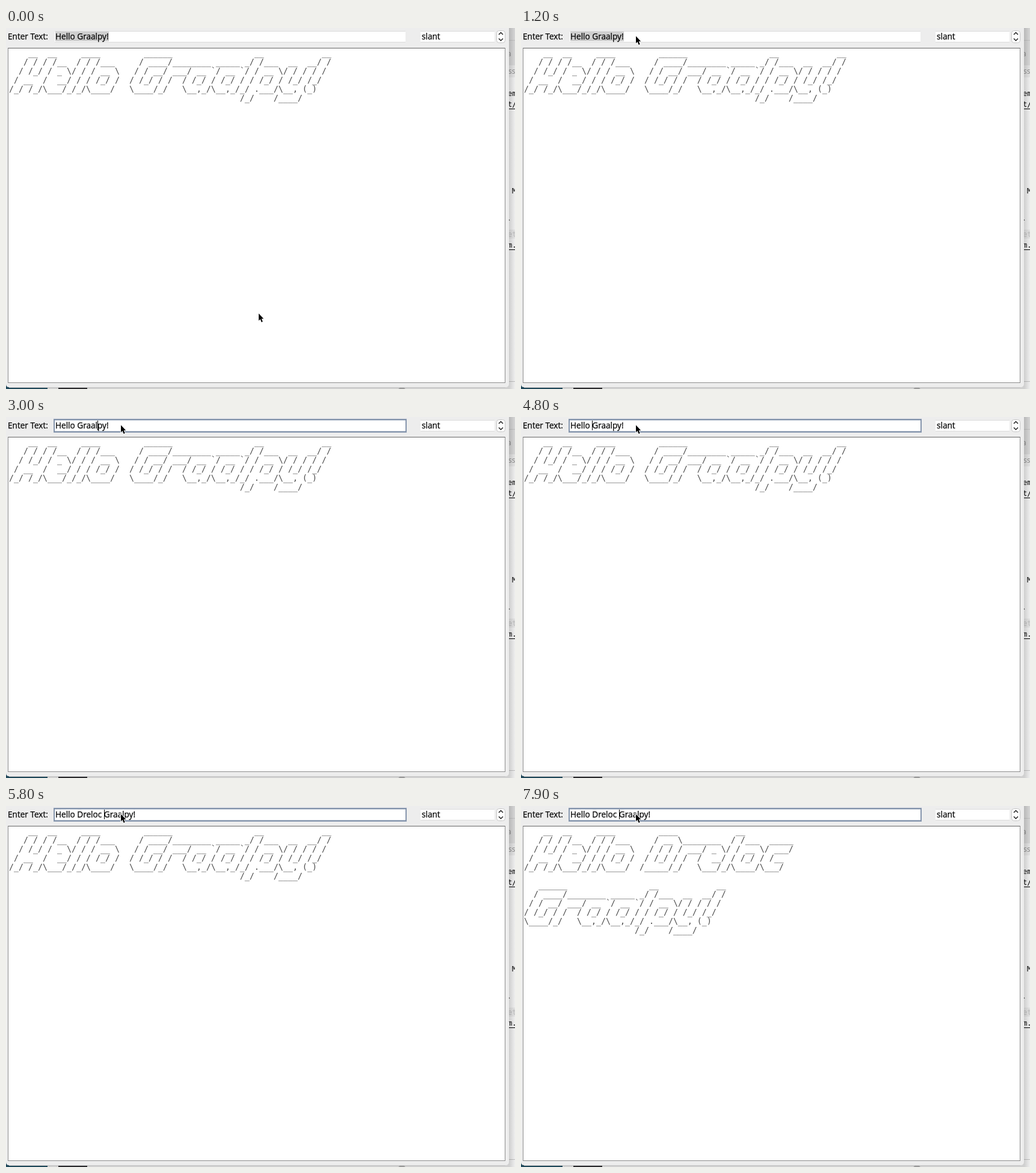
An HTML page that plays this animation: 846x600 px, repeating every 8 s.

```html
<!DOCTYPE html>
<html lang="en">
<head>
<meta charset="utf-8">
<title>Text banner</title>
<style>
  html, body { margin: 0; width: 100%; height: 100%; overflow: hidden; background: #ededed; }
  #stage { position: relative; width: 846px; height: 600px; overflow: hidden; color: #000;
    font: 13.6px/19px "Open Sans", "Noto Sans", sans-serif; white-space: pre; }
  #stage > * { position: absolute; box-sizing: border-box; }
  svg { left: 0; top: 0; }
  .field { top: 5px; height: 19px; background: #fff; border: solid #dcdcdc; border-width: 1px 0; }
  #input { left: 81px; width: 583px; }
  #input.focused { border-color: #c3ccd8; box-shadow: 0 0 0 1px #7b8ca5, 0 0 0 2px #8f9eb4; }
  #choice { left: 689px; width: 123px; }
  .label { top: 4px; -webkit-text-stroke: .25px #000; }
  #text { left: 82px; }
  #text.selected { top: 6px; height: 16px; line-height: 15px; background: #cecece; }
  #caret { display: inline-block; width: 1px; height: 16px; margin-right: -1px;
    background: #000; vertical-align: -3px; }
  #page { left: 3px; top: 33px; width: 827px; height: 557px; background: #fff;
    border: 1px solid #8c8c8c; border-top-color: #666; }
  pre { margin: 0; left: 5px; top: 34px; color: #484848;
    font: 13.29px/15px "DejaVu Sans Mono", monospace; }
  #word { left: calc(5px + 24ch); }
  #name { left: calc(5px + 25ch); }
  #name.wrapped { left: 5px; top: 124px; }
</style>
</head>
<body>
<div id="stage">
  <svg width="846" height="600">
    <defs>
      <linearGradient id="shade">
        <stop stop-opacity=".17"/><stop offset="1" stop-opacity=".04"/>
      </linearGradient>
    </defs>
    <path fill="#f8f8f8" d="M820 0h26v600h-26z"/>
    <path fill="#dedede" d="M820 0h26v62h-26z"/>
    <path fill="#ececec" d="M820 62h26v20h-26zM820 335h26v15h-26z"/>
    <path stroke="#c8c8c8" d="M836 20.5h10M836 587.5h10"/>
    <g font-family="DejaVu Sans Mono, monospace" font-size="12">
      <g fill="#8c8c8c" font-family="Open Sans, sans-serif">
        <text x="833" y="47">a</text><text x="835" y="76">ss</text>
      </g>
      <text x="834" y="113">em</text>
      <text x="834" y="131">t/</text>
      <text x="841" y="275">M</text>
      <text x="833" y="328">`</text>
      <text x="834" y="347" fill="#c4c4c4">et</text>
      <text x="834" y="365">m.</text>
      <path stroke="#000" d="M836 134.5h10M836 368.5h10"/>
    </g>
    <path fill="url(#shade)" d="M836 0h10v600h-10z"/>
    <path fill="#d0d0d0" d="M0 590h836v10H0z"/>
    <path fill="#20485a" d="M0 590h69v10H0z"/>
    <path fill="#2b2b2e" d="M87 590h48v10H87z"/>
    <circle cx="658" cy="604" r="7" fill="#999"/>
    <path fill="#ededed" d="M0 0H836V591Q836 597 830 597H5Q0 597 0 592Z"/>
    <path stroke="#c4c4c4" d="M5 597.5H830"/>
    <rect x="815.5" y="4.5" width="14" height="20" rx="4" fill="#fff" stroke="#c6c6c6"/>
    <path fill="none" stroke="#222" stroke-width="1.5" d="M819 11l3.5-3.5L826 11M819 17.5l3.5 3.5 3.5-3.5"/>
  </svg>

  <div class="label" style="left:3px">Enter Text:</div>
  <div id="input" class="field"></div>
  <div id="text" class="label"><span id="before"></span><i id="caret"></i><span id="after"></span></div>
  <div id="choice" class="field"></div>
  <div class="label" style="left:691px">slant</div>
  <div id="page"></div>

<pre>
    __  __     ____
   / / / /__  / / /___
  / /_/ / _ \/ / / __ \
 / __  /  __/ / / /_/ /
/_/ /_/\___/_/_/\____/</pre>
<pre id="word">
    ____            __
   / __ \________  / /___  _____
  / / / / ___/ _ \/ / __ \/ ___/
 / /_/ / /  /  __/ / /_/ / /__
/_____/_/   \___/_/\____/\___/</pre>
<pre id="name">
   ______                 __            __
  / ____/________ _____ _/ /___  __  __/ /
 / / __/ ___/ __ `/ __ `/ / __ \/ / / / /
/ /_/ / /  / /_/ / /_/ / / /_/ / /_/ /_/
\____/_/   \__,_/\__,_/_/ .___/\__, (_)
                       /_/    /____/</pre>

  <svg width="846" height="600">
    <circle id="click" cx="191" cy="13" r="19.7" fill="none" stroke="#000" stroke-width="2.8"/>
    <path id="pointer" d="M1 .5V12.6L3.6 10.1 5.7 14.9 7.7 14 5.7 9.3H9.2Z"
      stroke="#fff" stroke-width="1.6" paint-order="stroke"/>
  </svg>
</div>
<script>
const LOOP = 8000, FOCUS = 1500, CARET_START = 1600, REDRAW = 6800, BLINK = 500;
const greeting = "Hello Graalpy!", inserted = "Dreloc ";
const leftPresses = [2700, 2800, 3000, 3200, 3300, 3500, 3600, 3800];
const keyPresses = [4900, 5200, 5300, 5400, 5600, 5700, 5800];
const caretResets = [CARET_START, ...leftPresses, ...keyPresses];

// Pointer stops: time, x, y
const stops = [
  [0, 419, 474], [100, 335, 277], [400, 285, 205], [500, 226, 116], [600, 190, 62],
  [700, 182, 40], [800, 188, 32], [900, 189, 27], [1000, 190, 21], [1100, 190, 16], [1200, 190, 13]
];

const $ = id => document.getElementById(id);
const countPast = (times, t) => times.filter(time => time <= t).length;
const show = (id, on) => { $(id).style.visibility = on ? "visible" : "hidden"; };

function render(t) {
  const typed = countPast(keyPresses, t);
  const split = greeting.length - countPast(leftPresses, t);
  $("before").textContent = greeting.slice(0, split) + inserted.slice(0, typed);
  $("after").textContent = greeting.slice(split);

  const lastReset = caretResets[countPast(caretResets, t) - 1];
  show("caret", t >= CARET_START && Math.floor((t - lastReset) / BLINK) % 2 === 0);

  const focused = t >= FOCUS;
  $("input").classList.toggle("focused", focused);
  $("text").classList.toggle("selected", !focused);
  show("click", focused && t < CARET_START);

  show("word", t >= REDRAW);
  $("name").classList.toggle("wrapped", t >= REDRAW);

  const [, x, y] = stops.findLast(([time]) => time <= t);
  $("pointer").setAttribute("transform", `translate(${x} ${y})`);
}

function tick() {
  render(performance.now() % LOOP);
  requestAnimationFrame(tick);
}
tick();
</script>
</body>
</html>
```
